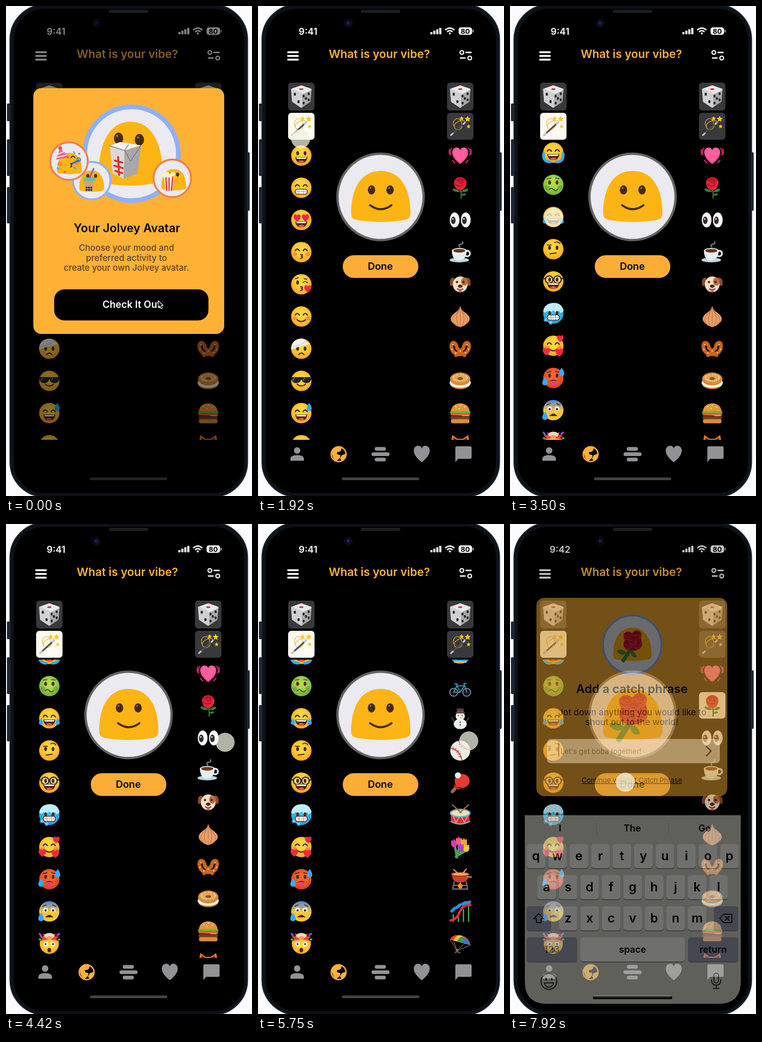
An HTML page for the animation above (8 s loop, 531x1055 px).

```html
<!DOCTYPE html>
<html lang="en">
<head>
<meta charset="utf-8">
<title>Mood picker</title>
<style>
html, body { margin: 0; width: 100%; height: 100%; overflow: hidden; background: #fcfcff; }
svg { display: block; width: 531px; height: 1055px; stroke-linecap: round; stroke-linejoin: round; }
text { font-family: Inter, sans-serif; white-space: pre; }
</style>
</head>
<body>
<svg id="stage" viewBox="0 0 531 1055"></svg>
<script>
const LOOP = 8000, STEP = 1000 / 12, PITCH = 69.3;
const INK = '#4b2a12', ORANGE = '#ffb136', PALE = '#eaeaf0', BLUE = '#8fb0fa', CORAL = '#f27d4d', CREAM = '#fffaf0';

// Drawing helpers
const P = (d, fill, line, w = 2) =>
  `<path d="${d}" fill="${fill || 'none'}"${line ? ` stroke="${line}" stroke-width="${w}"` : ''}/>`;
const O = (x, y, rx, fill, ry = rx, line, w = 2) =>
  `<ellipse cx="${x}" cy="${y}" rx="${rx}" ry="${ry}" fill="${fill}"${line ? ` stroke="${line}" stroke-width="${w}"` : ''}/>`;
const R = (x, y, w, h, r, fill, extra = '') =>
  `<rect x="${x}" y="${y}" width="${w}" height="${h}" rx="${r}" fill="${fill}" ${extra}/>`;
const T = (x, y, size, text, fill = '#000', weight = 600, anchor = 'middle', extra = '') =>
  `<text x="${x}" y="${y}" font-size="${size}" fill="${fill}" font-weight="${weight}" text-anchor="${anchor}" ${extra}>${text}</text>`;
const G = (x, y, body, sx = 1, sy = sx) => `<g transform="translate(${x} ${y}) scale(${sx} ${sy})">${body}</g>`;
const layer = (id, body, extra = '') => `<g id="${id}" ${extra}>${body}</g>`;
const scrim = id => layer(id, R(17, 30, 497, 1010, 50, '#000'));
const grad = (id, a, b) =>
  `<radialGradient id="${id}" cy=".4" r=".62"><stop offset=".3" stop-color="${a}"/><stop offset="1" stop-color="${b}"/></radialGradient>`;
const heart = (x, y, s, fill = '#f2293f') =>
  G(x, y, P('M0 9C-4 6-9 1-9-4C-9-8-6-9.5-4-9.5Q-1-9.5 0-6.5Q1-9.5 4-9.5C6-9.5 9-8 9-4C9 1 4 6 0 9z', fill), s);
const drop = (x, y, s = 1) => G(x, y, P('M0-9C9 3 6 9 0 9S-9 3 0-9z', '#38a9ee'), s);
const star = (x, y, s) => G(x, y, P('M0-5l1.5 3.3 3.5.4-2.6 2.4.8 3.6L0 3l-3.2 1.7.8-3.6L-5-1.3l3.5-.4z', '#f9c62d'), s);

// Faces
const face = (body, fill = 'url(#yellow)') => O(0, 0, 22, fill) + body;
const eyes = (y = -5) => O(-8, y, 3, INK, 4.5) + O(8, y, 3, INK, 4.5);
const arcs = P('M-13-3q4-7 9 0M4-3q4-7 9 0', 0, INK, 2.6);
const smile = P('M-9 7q9 8 18 0', 0, INK, 2.4);
const grin = P('M-13 3h26q-1 13-13 13t-13-13z', INK) + P('M-11 4h22l-1 3h-20z', '#fff') + O(0, 13, 6, '#f2584d', 2.5);
const frown = P('M-6 13q6-7 12 0', 0, INK, 2.4);
const teeth = R(-13, 3, 26, 11, 5, '#fff', `stroke="${INK}" stroke-width="1.6"`) + P('M-12 8.5H12M-5 4v9M5 4v9', 0, '#9b8878', 1);
const blush = O(-14, 4, 5, '#ff6d3a99', 4) + O(14, 4, 5, '#ff6d3a99', 4);
const kiss = P('M-2 5q8 0 2 4q7 2-2 5', 0, INK, 2.2);
const tears = drop(-18, 7, .8) + drop(18, 7, .8);
const flake = (x, y) => G(x, y, P('M-4 0h8M-2-3.5l4 7M-2 3.5l4-7', 0, '#a8e5ff', 1.3));

const moods = [
  face(eyes() + grin),
  face(arcs + teeth),
  face(heart(-9, -4, .85) + heart(9, -4, .85) + grin),
  face(blush + arcs + kiss),
  face(O(-8, -4, 3, INK, 4.5) + P('M4-4q5-5 9 1M-13-12l6-2M6-12l6 1', 0, INK) + kiss + heart(14, 10, .85)),
  face(blush + arcs + smile),
  face(eyes(0) + frown + P('M-22-2C-21-17-8-23 4-21L19-10Q4-8-22 2z', '#f1f1f1') + P('M-20-4Q0-7 11-17', 0, '#c8c8cc', 1.2)),
  face(P('M-22-8H22v4q-3 9-11 9T0-3q-3 8-11 8t-11-9z', '#242426') + P('M-15-6l-3 5M7-6L4-1', 0, '#777', 2) + smile),
  face(arcs + grin + drop(17, -13, .95)),
  face(arcs + grin + P('M-21 2q-2 18 14 18M21 2q2 18-14 18', 0, '#38a9ee', 6)),
  face(eyes() + P('M-13-13l8-1M13-13l-8-1', 0, '#456318') + P('M-9 10q4-5 9 0t9 0', 0, '#456318', 2.6) + O(-14, 6, 5, '#5b983188') + O(14, 6, 5, '#5b983188'), 'url(#green)'),
  face(arcs + grin + tears),
  face(eyes(-3) + P('M-13-9h9M3-14q7-4 11 2', 0, INK) + P('M-7 10l13-2', 0, INK, 2.4)),
  face(O(-9, -4, 8, '#fff6', 8, '#292422', 2.5) + O(9, -4, 8, '#fff6', 8, '#292422', 2.5) + P('M-22-6h5M17-6h5', 0, '#292422', 2.5) + eyes(-4) + grin),
  face(P('M-22-5Q-19-22 0-23T22-5l-6 4-4-5-6 4-6-5-7 5-5-4-5 4z', '#bdeeff') + eyes(-1) + teeth + flake(-17, 14) + flake(18, -8) + flake(-6, 20), 'url(#ice)'),
  face(blush + arcs + smile + heart(15, -15, .8) + heart(-15, 13, .9) + heart(13, 15, .95)),
  face(eyes() + P('M-13-12l8-2M13-12l-8-2', 0, INK) + P('M-9 7q9-7 18 0z', INK) + P('M-5 6h10v8q-5 6-10 0z', '#ee3f72') + drop(-18, 7) + drop(18, -13), 'url(#red)'),
  face(O(-8, -3, 5, '#fff') + O(8, -3, 5, '#fff') + O(-8, -2, 2.5, INK) + O(8, -2, 2.5, INK) + P('M-14-11l7-3M14-11l-7-3', 0, INK) + P('M-9 13q9-11 18 0z', INK) + drop(-18, 12), 'url(#worry)'),
  P('M-20-6Q0-12 20-6C23 8 14 22 0 22S-23 8-20-6z', 'url(#yellow)') + O(-8, 1, 5, '#fff') + O(8, 1, 5, '#fff') + O(-8, 1, 2, INK) + O(8, 1, 2, INK) + O(0, 14, 4, INK, 5)
    + P('M-20-5l5-5-6-5 9-1-2-6 14 5 14-5-2 6 9 1-6 5 5 5Q0-13-20-5z', '#ea4938') + O(0, -17, 11, '#f1d6c2', 6) + O(0, -12, 6, '#f5a04a', 4)
    + P('M-18-17l-3-4M17-18l4-3', 0, '#8b54d6', 4) + P('M-21-9h2M20-9h2', 0, '#45b557', 4)
];

// Activities
const roseHead = O(0, -10, 11, '#d3162e', 10) + P('M-11-14Q-12 2 0 4 12 2 11-14Q4-9 0-12-4-9-11-14z', '#e2253c')
  + P('M-5-13q5-6 9 0t-6 3M-9-8q6 7 14 2', 0, '#9e0d27', 1.5);
const rose = P('M0 2Q3 10 2 22', 0, '#2c7035', 3) + P('M1 8Q-16-2-17 4-10 12 1 8Q17-2 17 5 12 12 1 8zM2 16Q9 9 13 14 9 19 2 16z', '#318039') + G(0, 1, roseHead, 1.2);
const eyeball = x => O(x, 0, 10.5, '#fafafa', 16) + O(x - 3, 1, 5, '#342b2b', 8) + O(x - 4, -2, 1.7, '#fff');
const wheel = x => O(x, 7, 8.5, 'none', 8.5, '#7c8790', 2.2) + P(`M${x - 8} 7h16M${x} -1v16`, 0, '#66747d', .7);
const seeds = n => Array.from({ length: n }, (_, i) => O(Math.cos(i * 2.4) * 15, -7 + Math.sin(i * 2.4) * 7, 1.1, '#fff1c6')).join('');
const tulip = (x, y, fill) => G(x, y, P('M-5-6l3 2 2-4 2 4 3-2Q8 7 0 8-8 7-5-6z', fill), 1.15);
const pretzel = 'M-9 14L7-1C9-17 21-16 19-3Q16 12 0 12T-19-3C-21-16-9-17-7-1L9 14';
const activities = [
  heart(0, 1, 1.95, '#ee3f86') + heart(0, 0, 1.75, '#ff5f9e') + P('M-18-16q-6 7-2 15M18-16q6 7 2 15M-23-14q-2 6 0 12M23-14q2 6 0 12M-17 10l5 6M17 10l-5 6', 0, '#ec287c', 2),
  rose,
  eyeball(-12) + eyeball(12),
  O(-2, 17, 21, '#c2d4dd', 5) + O(15, 3, 6, 'none', 6, '#d8e4e8', 4) + P('M-18-3H14Q13 17-2 18T-18-3z', '#e5eef0') + O(-2, -3, 16, '#fafafa', 6) + O(-2, -3, 13, '#68361f', 4) + P('M-1-11q-4-5 2-6t4-5', 0, '#6e7478', 3),
  P('M-13-14Q-24-16-22 2q5 5 9-7zM13-14Q24-16 22 2q-5 5-9-7z', '#8c4d2d') + O(0, 0, 16, '#f2dcc2', 17) + O(9, -6, 7, '#b86d43', 9) + O(-7, -5, 2.5, INK) + O(7, -5, 2.5, INK) + O(0, 4, 5, INK, 3.5) + P('M-6 10q6 3 12 0', 0, INK) + P('M-3 11h6v5q-3 4-6 0z', '#e54867'),
  P('M0-23Q2-13 10-9 32 6 8 20L0 23-8 20Q-32 6-10-9-2-13 0-23z', '#e8a066') + P('M0-18Q-14 3-4 20M0-18Q14 3 4 20M-3-11Q-26 6-9 19M3-11Q26 6 9 19M0-14v34', 0, '#c2703f', 1.2),
  P(pretzel, 0, '#8c3e0f', 9) + P(pretzel, 0, '#c8691f', 6) + P('M-16-9l1 1M15-9l-1 1M-10 10l1-1M12 9l-1-1M0 5v1M-18 1v1M18 1v1', 0, '#fff0c3', 2),
  O(0, 6, 22, '#c57a32', 12) + O(0, 4, 23, '#f7f0df', 11) + O(0, -4, 22, '#d98b3b', 14) + O(0, -6, 18, '#e6a455', 9) + seeds(15) + O(0, -5, 6, '#8e5024', 3),
  P('M-20-3C-20-27 20-27 20-3z', '#e2963a') + R(-22, -4, 44, 5, 2, '#62b92f') + R(-21, 0, 42, 5, 2, '#ef4938') + P('M-22 4H22L10 10 4 5z', '#ffd13b') + R(-21, 6, 42, 8, 4, '#713d22') + R(-20, 13, 40, 9, 4, '#d78c35') + P('M-10-14h1M0-17h1M9-13h1M-3-10h1', 0, '#fff1c6', 2),
  P('M-17-22L-6-14H6L17-22 22 2 0 20-22 2z', '#f5792c') + P('M-15-17l1 11 7-6zM15-17l-1 11-7-6z', '#6a2e25') + P('M-20 2L-5 3 0 18 5 3 20 2 0 21z', '#fff0dc') + eyes(-2),
  O(0, 4, 21, '#2e9fe0', 17) + P('M-18 7q9 6 18 0t18 0', 0, '#ffd041', 5) + P('M-12 17H12', 0, '#ffb43c', 4),
  G(0, 6, wheel(-14) + wheel(14) + P('M-14 7L-7-7H9L0 7zM-9-11L0 7M14 7L8-12h5M-12-11h6', 0, '#3796b1', 2.2)),
  O(0, 12, 14, '#e9eef1', 11) + O(0, -5, 10, '#f5f7f8', 9) + P('M-9-12h18M-6-20H6v7H-6z', '#454144', '#454144', 3) + P('M-6-14H6', 0, '#d83a3a', 2) + O(-4, -6, 1.3, INK) + O(4, -6, 1.3, INK) + P('M0-3l5 2-5 1z', '#ed873c') + P('M-13 7l-5-9M13 7l5-9', 0, '#795340', 1.8) + O(0, 8, 1.3, INK) + O(0, 14, 1.3, INK),
  O(0, 0, 21.5, '#eeebe5') + P('M-20-5Q-2-3 4 21M-3-21Q3-4 21-2', 0, '#d13d36', 2) + P('M-15-8l-1 6M-9-5l-3 5M-3 0l-5 4M1 6l-6 2M3 13l-6 0M-2-14l6-1M2-8l5-4M7-4l4-5M14-2l2-5', 0, '#d13d36', 1.5),
  P('M-8 9l-9 10', 0, '#a9672e', 7) + O(4, -4, 16, '#e43a31', 15) + P('M-12 2Q-7 12 4 12l-9 3-9-8z', '#ae2528') + O(-5, -16, 6.5, '#eee'),
  P('M-20-4H20V14Q0 25-20 14z', '#d93136') + P('M-17 0l8 16 9-16 9 16 8-16', 0, '#f4c0ad', 1.6) + P('M-20 14Q0 25 20 14', 0, '#68b4c6', 3) + O(0, -4, 21, '#f3dfbd', 8, '#68b4c6', 3) + P('M-17-22L2-5M18-22L-1-5', 0, '#a9672e', 2.5),
  P('M-12-5L-7 22M0-5L-9 21M11 0L-9 21M15 6L-9 20', 0, '#49a347', 5) + tulip(-13, -9, '#d83dad') + tulip(-3, -14, '#f15b80') + tulip(8, -11, '#f9a42a') + tulip(13, 1, '#f0c830') + tulip(1, 0, '#aa42d1'),
  P('M-13 5L-16 21H16L13 5M-14 13H14', 0, '#706865', 3) + P('M0 7q10 9 0 14-10-6 0-14z', '#f58b25') + P('M-18-11H18Q18 7 0 7T-18-11z', '#cd3e27') + O(0, -11, 19, '#eeb55d', 4, '#a92e22') + P('M16-5h8M-14-21L-3-11M13-22L4-11', 0, '#d4a66a', 2.5),
  P('M-15 7v14M-4 3v18M7-4v25M18-11v32', 0, '#35a64b', 3) + P('M-21 19Q-8 18-1 1T22-14', 0, '#e52b36', 5) + P('M-18-1l6-6M-7-9l6-5M5-16l6-3M15-19l5-1', 0, '#278dd8', 7),
  G(0, 0, P('M-22-9C-14-27 20-19 22 3Q2-2-22-9z', '#e34334') + P('M-15-7C-6-24 8-21 16 1z', '#f4c13b') + P('M-7-5C2-22 12-16 16 1z', '#3a9b50') + P('M4-2Q14-21 22 3z', '#3d74d8') + P('M-22-9L-7 15 22 3M-14-6L-7 15 10-1', 0, '#bb9b7c', 1) + O(-7, 14, 3, '#a66a42') + P('M-11 19l6-2 4 3', 0, '#48566d', 3))
];

const dice = P('M0-22L20-15 18 10 0 22-18 10-20-15z', '#a9a9ac', '#a9a9ac', 4) + P('M0-22L20-15 0-6-20-15z', '#e8e8ea', '#e8e8ea', 4) + P('M-20-15L0-6V22L-18 10z', '#d0d0d3', '#d0d0d3', 4)
  + O(0, -16, 4.5, '#e3383b', 2) + O(-14, -5, 2.4, '#222', 3.2) + O(-6, 11, 2.4, '#222', 3.2)
  + [[5, -1], [16, -6], [10, 4], [5, 14], [16, 7]].map(([x, y]) => O(x, y, 2.2, '#222', 3)).join('');
const wand = P('M-12 2C-22-12-4-25 2-10S-3 11-11 5C-21-7 9-19 11-8', 0, '#e7b42b', 1.2) + P('M-20 19L10-8', 0, '#4d4d55', 3.6) + P('M-20 19l4-3.6M7-5l3-3', 0, '#c5c3cc', 3.6)
  + star(3, -17, 1) + star(16, -16, 1.3) + star(18, 0, .9);

// Avatars
const blob = P('M-64 36C-64-18-42-55 0-55S64-18 64 36Q64 48 54 50Q0 60-54 50Q-64 48-64 36z', '#fdb415');
const blobEyes = (y = -14) => O(-20, y, 8, '#442b09', 10) + O(20, y, 8, '#442b09', 10) + O(-22, y - 4, 2, '#8c6c3c') + O(18, y - 4, 2, '#8c6c3c');
const disc = (x, y, r, line, w, body) => O(x, y, r, PALE, r, line, w) + body;
const bouquet = P('M-4 14L-30 54', 0, '#39893b', 12) + P('M-14 30Q-42 10-52 22-40 42-14 30zM-6 24Q10 20 16 42-4 48-6 24z', '#3f9440') + O(2, -8, 29, '#b80f2b', 30)
  + [[-14, -14], [15, -18], [-14, 14], [17, 12], [1, -1]].map(([x, y]) => G(x, y, roseHead, 1.4)).join('');
const roseBlob = blob + blobEyes(-28) + bouquet;
const takeout = P('M224 301L256 311 254 372 230 360z', '#d9d9db') + P('M256 311L291 300 284 361 254 372z', '#a8a8aa') + P('M224 301L246 293 291 300 256 311z', '#f5f5f5')
  + P('M224 301l32 10 8-12M291 300l-22 34-13-23', 0, '#777', 1.5) + P('M242 325l2 39M235 333l16 4M234 344l18 5M236 355l15 5', 0, '#e82c25', 4);
const partyBlob = G(137, 339, blob, .42) + G(137, 329, arcs, .9) + O(116, 340, 5, '#ff7548aa') + O(153, 337, 5, '#ff7548aa')
  + P('M108 331L117 306 136 325z', '#ee6289') + P('M113 319l11-5M110 326l20-5', 0, '#fff', 2) + O(117, 306, 4, '#ef4268')
  + P('M142 340l15-8', 0, '#3277c5', 4) + O(157, 331, 4, 'none', 4, '#3277c5', 2) + P('M139 339q5 0 1 4 5 2-1 4', 0, INK)
  + P('M111 349l3 2M147 347l3 3M146 314l2 3', 0, '#38a9ee', 3) + P('M126 357h2M157 318h2', 0, '#e83a60', 3);
const bobaBlob = G(185, 377, blob + blobEyes(-27), .42) + P('M168 374h22l-3 25h-15z', '#d2a17a') + R(167, 369, 26, 8, 4, '#67c0a0') + P('M181 369l8-19', 0, '#8a55bb', 3)
  + [0, 1, 2, 3, 4, 5].map(i => O(174 + i % 3 * 5, 391 + (i > 2) * 5, 2.2, '#472b25')).join('');
const popcornBlob = G(362, 374, blob + blobEyes(-27), .42) + P('M341 367h22l-4 31h-14z', '#fff') + P('M345 368l2 29M352 368v29M360 368l-3 29', 0, '#dc3c36', 3)
  + [342, 348, 354, 360].map((x, i) => O(x, 365 - i % 2 * 3, 5, '#fff0bb')).join('');

// Screens
const column = (list, x) => list.map((body, i) => G(x, 322 + PITCH * i, body)).join('');
const tiles = (x, wandFill) => R(x, 165, 57, 60, 7, '#39393c') + G(x + 28.5, 195, dice) + R(x, 230, 57, 58, 7, wandFill) + G(x + 28.5, 259, wand);
const phone = [[2, 210, 38], [2, 287, 79], [2, 390, 78], [519, 315, 126]].map(([x, y, h]) => R(x, y, 7, h, 2, '#1d2631')).join('')
  + R(8.5, -3, 513, 1060, 75, '#0d1218', 'stroke="#202a35" stroke-width="2"') + R(17, 6, 497, 1043, 66, '#000')
  + R(222, 8, 85, 7, 3, '#1c1d20') + O(195, 37, 10, '#0a0b16') + O(195, 37, 4.5, '#141a45') + O(194, 36, 1.6, '#26367a');
const status = T(108, 62, 20, '9:41', '#fff', 600, 'middle', 'id="clock"')
  + [0, 1, 2, 3].map(i => R(372 + i * 6.4, 56 - i * 3, 4.6, 5 + i * 3, 1.3, '#fff')).join('')
  + P('M405 51q9-7 18 0M409 55q5-4 10 0', 0, '#fff', 3) + O(414, 59, 2.2, '#fff')
  + R(433, 46, 29, 16, 5, '#fff') + R(463, 51, 2.5, 6, 1, '#aaa') + T(447.5, 59.5, 15, '80', '#000', 700);
const header = P('M65 99.5h21M65 107.5h21M65 115.5h21', 0, '#fff', 4) + T(262, 112, 24.5, 'What is your vibe?', ORANGE)
  + O(440, 100, 4, 'none', 4, '#fff', 2.6) + O(457, 112, 4, 'none', 4, '#fff', 2.6) + P('M449 100h11M437 112h10', 0, '#fff', 2.8);
const GREY = '#929296';
const nav = O(84.5, 957, 7, GREY) + P('M70 979v-4q0-8 14.5-8t14.5 8v4z', GREY)
  + O(174, 965, 16, '#000', 16, ORANGE, 3) + P('M159 961q4-10 15-12l7 3-3 7-8 2 1 4 7 2-1 6-8 7q-8-5-10-19zM181 967l9-3q0 11-9 16l-4-6z', ORANGE)
  + P('M256 953.5h16M249 965h31M256 976.5h16', 0, GREY, 8) + heart(353.5, 965, 1.92, GREY)
  + P('M429 948h29q3 0 3 3v21q0 3-3 3h-26l-6 7v-31q0-3 3-3z', GREY);
const intro = R(59, 177, 412, 529, 17, ORANGE)
  + disc(271, 318, 101, BLUE, 10, G(269, 318, blob, 1.08, 1.25) + O(243, 285, 10, '#442b09', 12.5) + O(288, 288, 10, '#442b09', 12.5) + O(240, 280, 2.5, '#8c6c3c') + O(285, 283, 2.5, '#8c6c3c') + takeout)
  + disc(185, 376, 40.5, BLUE, 4, bobaBlob) + disc(136, 334, 40.5, CORAL, 4, partyBlob) + disc(359, 371, 40.5, CORAL, 4, popcornBlob)
  + T(261, 487, 25.4, 'Your Jolvey Avatar')
  + ['Choose your mood and', 'preferred activity to', 'create your own Jolvey avatar.'].map((s, i) => T(260, 527 + i * 21.7, 18.5, s, '#5c421b', 500)).join('')
  + R(104, 610, 333, 67, 22, '#000') + T(271, 650, 21, 'Check It Out', '#fff');

const MOD = '#9a9db4';
const key = (x, y, w, label, fill = '#f6f6f2', size = 27) =>
  R(x, y + 2, w, 52, 6, '#85888e') + R(x, y, w, 52, 6, fill) + T(x + w / 2, y + 26 + size * .34, size, label);
const row = (letters, x, y) => [...letters].map((s, i) => key(x + i * 46.4, y, 40, s)).join('');
const keyboard = P('M32 627H498V985Q498 1033 450 1033H80Q32 1033 32 985z', '#d6d6cb')
  + T(108, 662, 20, 'I') + T(264, 662, 20, 'The') + T(420, 662, 20, 'Go') + P('M187 641v29M342 641v29', 0, '#a9abb1', 1)
  + row('qwertyuiop', 36, 689) + row('asdfghjkl', 59, 756) + key(36, 823, 53, '', MOD) + row('zxcvbnm', 105.5, 823) + key(440, 823, 53, '', MOD)
  + P('M62 839l11 11h-6v8h-10v-8h-6zM461 840h18v18h-18l-8-9zM465 845l8 8M473 845l-8 8', 0, '#000', 1.8)
  + key(36, 890, 109, '123', MOD, 20) + key(152, 890, 225, 'space', undefined, 20) + key(384, 890, 109, 'return', MOD, 20)
  + O(84, 985, 17, 'none', 17, '#222', 2.2) + O(78, 980, 2, '#222', 3) + O(90, 980, 2, '#222', 3) + P('M74 988h20q-2 9-10 9t-10-9z', 0, '#222')
  + R(440, 967, 10, 21, 5, 'none', 'stroke="#222" stroke-width="2"') + P('M435 981q0 12 10 12t10-12M445 993v7M439 1000h12', 0, '#222') + R(179, 1017, 171, 6, 3, '#000');
const phrase = R(57, 159, 412, 427, 17, ORANGE)
  + disc(264, 260, 63, BLUE, 4, G(264, 259, roseBlob, .65)) + T(263, 364, 25.8, 'Add a catch phrase')
  + T(264, 412, 18.7, 'Jot down anything you would like to', '#42300f', 500) + T(263, 433, 18.7, 'shout out to the world!', '#42300f', 500)
  + T(263, 557, 14.8, 'Continue without Catch Phrase', '#33240a', 400, 'middle', 'text-decoration="underline"') + keyboard;
const field = R(80, 463, 373, 52, 8, '#ffe9c8') + P('M105 473v27', 0, '#000', 1.5)
  + T(109, 495, 15.4, 'Let\'s get boba together!', '#8b7554', 400, 'start') + P('M424 479l10 10-10 10', 0, '#4a3a1c', 3);

const stage = document.getElementById('stage');
stage.innerHTML = `<defs>${grad('yellow', '#ffd63d', '#fba51c')}${grad('green', '#b2d84f', '#69ab36')}${grad('ice', '#39bff4', '#209bdc')}${grad('red', '#f4662f', '#db3b1e')}
  <linearGradient id="worry" x2="0" y2="1"><stop stop-color="#4b83df"/><stop offset=".55" stop-color="#fbc632"/></linearGradient>
  <clipPath id="window"><rect x="30" y="292" width="470" height="642"/></clipPath></defs>`
  + phone + status + header + tiles(65, CREAM) + tiles(408, '#39393c')
  + `<g clip-path="url(#window)">${layer('left', column(moods, 93.5))}${layer('right', layer('picked', R(408, 362, 57, 57, 7, CREAM)) + column(activities, 436.5))}</g>`
  + disc(264.5, 411, 93, '#62625f', 5, G(265, 410, layer('plain', blob + blobEyes() + P('M-23 19Q0 36 23 19', 0, '#442b09', 4.5)) + layer('rosy', roseBlob)))
  + R(183, 536.5, 163, 49, 24, '#fcad38') + T(264, 568, 21.3, 'Done') + layer('nav', nav) + R(181, 1015, 167, 6, 3, '#424244')
  + scrim('introScrim') + layer('intro', intro) + scrim('phraseScrim') + layer('phrase', phrase) + layer('field', field)
  + layer('arrow', P('M0 0V14l3.5-3 2.5 6 3-1.2-2.6-5.8H11z', '#000', '#fff', 1.2))
  + layer('touch', O(0, 0, 20, '#f0f2e2', 20, '#fff', 1), 'opacity=".74"');

// Motion: rows of [time, ...values]
const path = [[420, 290, 636], [750, 290, 636], [830, 309, 644], [1000, 315, 648], [1250, 315, 648], [1750, 90, 266], [2080, 94, 304],
  [2170, 94, 304], [2330, 94, 380], [2670, 94, 455], [3920, 94, 455], [4420, 473, 470], [4580, 510, 469], [4750, 455, 467],
  [6590, 455, 467], [6830, 443, 388], [7170, 443, 388], [7580, 249, 556]];
const arrowPath = [[0, 329, 635], [250, 295, 620]];
const leftScroll = [[2830, 0], [2920, 2], [3000, 70], [3080, 70], [3170, 300], [3250, 430], [3330, 430], [3420, 570], [3500, 630], [3580, 630], [3670, 666]];
const rightScroll = [[4750, 0], [5080, 330], [5330, 590], [5580, 725], [5750, 735], [6080, 735], [6420, 0]];
const introFade = [[1170, 1], [1670, 0]];
const phraseFade = [[7670, 0], [7920, .45]];

function track(rows, t, ease = u => u) {
  const next = rows.findIndex(r => r[0] > t);
  if (next < 1) return rows[next ? rows.length - 1 : 0].slice(1);
  const a = rows[next - 1], b = rows[next], u = ease((t - a[0]) / (b[0] - a[0]));
  return a.slice(1).map((v, i) => v + (b[i + 1] - v) * u);
}
const smooth = u => u * u * (3 - 2 * u);
const $ = id => document.getElementById(id);
const show = (id, on) => $(id).setAttribute('display', on ? 'inline' : 'none');
const move = (id, x, y) => $(id).setAttribute('transform', `translate(${x} ${y})`);
const fade = (id, value) => $(id).setAttribute('opacity', value);

function draw(ms) {
  const t = Math.min(95, Math.floor((ms % LOOP + 3.5) / STEP)) * STEP + 3.4;
  const chosen = t >= 7250, [intro] = track(introFade, t), [phrase] = track(phraseFade, t);
  move('left', 0, -track(leftScroll, t)[0]);
  move('right', 0, -track(rightScroll, t)[0]);
  move('arrow', ...track(arrowPath, t));
  move('touch', ...track(path, t, smooth));
  show('arrow', t < 420);
  show('touch', t >= 420);
  show('picked', chosen);
  show('rosy', chosen);
  show('plain', !chosen);
  fade('introScrim', intro * .48);
  fade('intro', intro);
  fade('nav', 1 - intro);
  fade('phraseScrim', phrase * .5);
  fade('phrase', phrase);
  fade('field', phrase);
  $('clock').textContent = chosen ? '9:42' : '9:41';
}

const start = performance.now();
function tick() {
  draw(performance.now() - start);
  requestAnimationFrame(tick);
}
tick();
</script>
</body>
</html>
```
